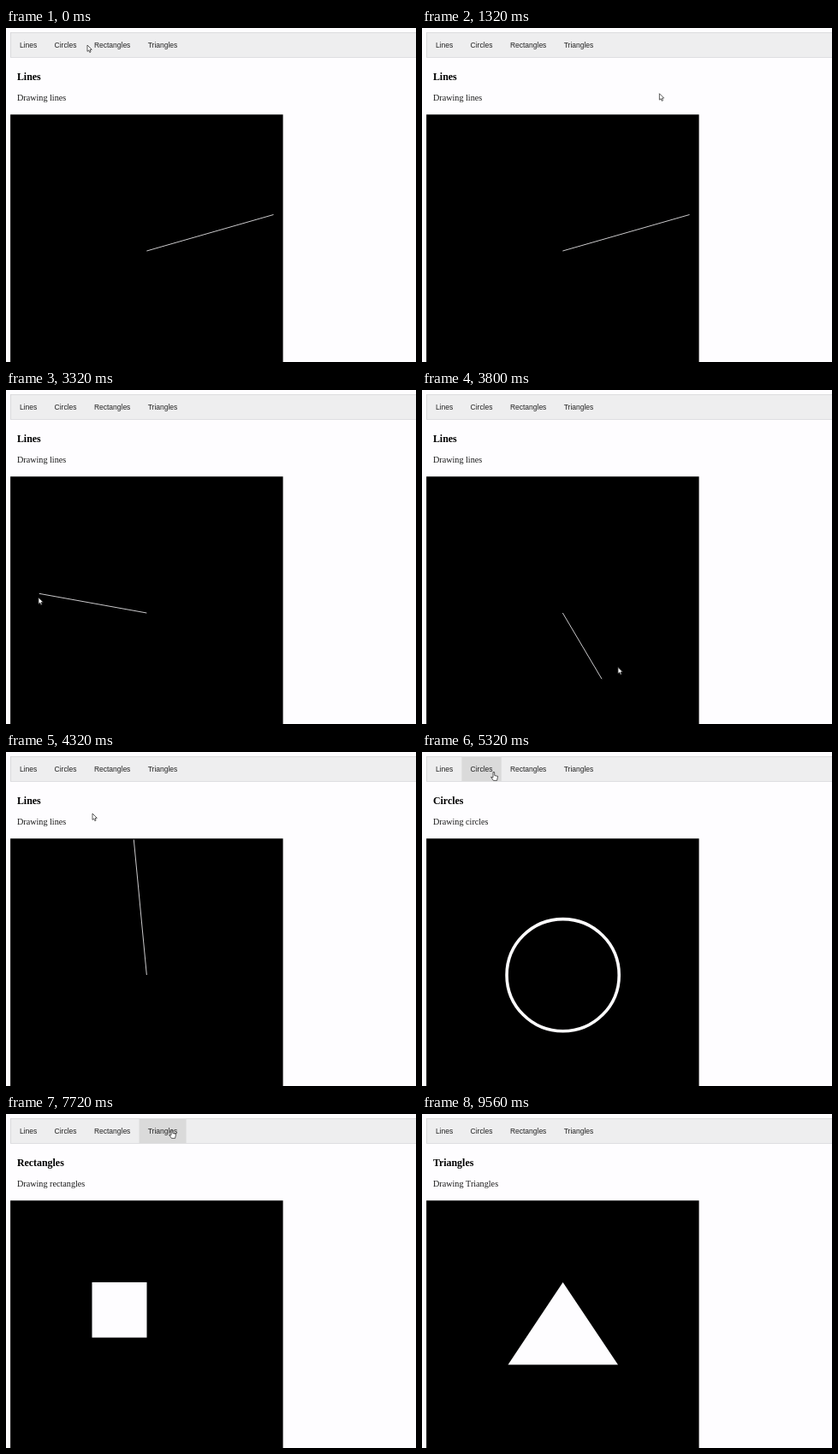
An HTML page with a canvas for the animation above (9.88 s loop, 479x391 px).

```html
<!DOCTYPE html>
<html lang="en">
<head>
<meta charset="utf-8">
<title>Drawing shapes</title>
<style>
  html, body { margin: 0; width: 100%; height: 100%; overflow: hidden; background: #fefdff; }
  canvas { display: block; width: 479px; height: 391px; }
</style>
</head>
<body>
<canvas id="stage"></canvas>
<script>
const LOOP = 9880, STEP = 40, PAPER = '#fefdff';
const SANS = '8.49px "Liberation Sans", Arial, sans-serif';
const SERIF = '"Liberation Serif", "Times New Roman", serif';
const area = { x: 5.1, y: 101.3, w: 318.5, h: 290 };
const center = { x: area.x + area.w / 2, y: 261 };
const nav = { x: 5.7, top: 5.7, bottom: 34 };

const stage = document.getElementById('stage');
const ratio = window.devicePixelRatio || 1;
stage.width = 479 * ratio;
stage.height = 391 * ratio;
const ctx = stage.getContext('2d');
ctx.scale(ratio, ratio);

// Each tab is as wide as its name plus padding; it opens at its click time.
ctx.font = SANS;
const pad = 10.2;
let left = nav.x;
const tabs = [['Lines', 0], ['Circles', 4800], ['Rectangles', 6880], ['Triangles', 7960]]
  .map(([name, opens]) => {
    const width = ctx.measureText(name).width + 2 * pad, x = left;
    left += width;
    return { name, opens, x, width };
  });

// Eased mouse moves with rests between them: start, end, x, y, sideways bend
const moves = [
  [0, 1000, 150, 70, -22],
  [1040, 1640, 433, 85],
  [1900, 2240, 189, 132],
  [2240, 2880, 70, 43],
  [2880, 3320, 38, 243],
  [3320, 3880, 246, 312, 100],
  [3880, 4320, 101, 72, 47],
  [4320, 4760, 84, 23],
  [5320, 5920, 146, 128],
  [6080, 6520, 124, 20],
  [6880, 7600, 194, 18],
  [7960, 8480, 372, -30, 40]
];

function mouse(t) {
  t = (t + LOOP) % LOOP;
  let x = 95, y = 20;
  for (const [start, end, toX, toY, bend = 0] of moves) {
    if (t < start) break;
    const u = Math.min(1, (t - start) / (end - start));
    const s = u * u * (3 - 2 * u);
    const dx = toX - x, dy = toY - y;
    const side = bend * Math.sin(Math.PI * s) / Math.hypot(dx, dy);
    x += dx * s - dy * side;
    y += dy * s + dx * side;
  }
  return [x, y];
}

function overTab(t) {
  const [x, y] = mouse(t);
  if (y < nav.top || y > nav.bottom) return -1;
  return tabs.findIndex(tab => x >= tab.x && x < tab.x + tab.width);
}

// The line keeps pointing at the last mouse place inside the black area.
function lineEnd(t) {
  for (t -= STEP; t > 1900; t -= STEP) {
    const [x, y] = mouse(t);
    if (x >= area.x && x <= area.x + area.w && y >= area.y) return [x, y];
  }
  return [312.5, 218.5];
}

function text(words, x, y, font, color) {
  ctx.font = font;
  ctx.fillStyle = color;
  ctx.fillText(words, x, y);
}

function box(color, x, y, w, h) {
  ctx.fillStyle = color;
  ctx.fillRect(x, y, w, h);
}

function poly(...points) {
  ctx.beginPath();
  points.forEach(([x, y]) => ctx.lineTo(x, y));
  ctx.closePath();
}

function drawNav(t) {
  const height = nav.bottom - nav.top;
  box('#d2d2d5', 5, 5, 474, height + 1.4);
  box('#eeeeef', nav.x, nav.top, 474, height);
  tabs.forEach((tab, i) => {
    let heat = 0;
    for (let k = 1; k <= 8; k++) heat += (overTab(t - k * STEP) === i) / 8;
    const shade = Math.round(238 - 20 * heat);
    if (heat) box(`rgb(${shade},${shade},${shade})`, tab.x, nav.top, tab.width, height);
    text(tab.name, tab.x + pad, 22.6, SANS, '#222');
  });
}

const shapes = [
  t => {
    ctx.beginPath();
    ctx.moveTo(center.x, center.y);
    ctx.lineTo(...lineEnd(t));
    ctx.lineWidth = 0.8;
    ctx.stroke();
  },
  () => {
    ctx.beginPath();
    ctx.arc(center.x + 0.3, center.y + 0.2, 65.6, 0, 7);
    ctx.lineWidth = 3.6;
    ctx.stroke();
  },
  () => box(PAPER, 100.5, 197, 64, 64.7),
  () => {
    poly([164.6, 197], [100.5, 293.5], [229, 293.5]);
    ctx.fill();
  }
];

function drawMouse(t) {
  const [x, y] = mouse(t);
  ctx.save();
  ctx.translate(x, y);
  if (overTab(t - 2 * STEP) >= 0 && overTab(t) >= 0) {
    poly([-1, 0.5], [0.6, 0.5], [0.8, 4.5], [4.6, 5.4], [3.6, 10.4], [-0.6, 10.4], [-3.4, 6.4], [-1, 6.8]);
  } else {
    poly([0, 0], [0, 7.4], [1.7, 6], [2.8, 8.6], [4.1, 8], [3, 5.5], [5.3, 5.3]);
  }
  ctx.fillStyle = '#fff';
  ctx.strokeStyle = '#333';
  ctx.lineWidth = 0.8;
  ctx.lineJoin = 'round';
  ctx.fill();
  ctx.stroke();
  ctx.restore();
}

function draw(now) {
  const t = Math.floor(now % LOOP / STEP) * STEP;
  const page = tabs.filter(tab => t >= tab.opens).length - 1;
  const { name } = tabs[page];
  box(PAPER, 0, 0, 479, 391);
  drawNav(t);
  text(name, 12.9, 61, `bold 11.92px ${SERIF}`, '#000');
  text('Drawing ' + (page === 3 ? name : name.toLowerCase()), 12.9, 85.2, `10.19px ${SERIF}`, '#1a1a1a');
  box('#000', area.x, area.y, area.w, area.h);
  ctx.fillStyle = ctx.strokeStyle = PAPER;
  shapes[page](t);
  drawMouse(t);
}

const start = performance.now();
function tick() {
  draw(performance.now() - start);
  requestAnimationFrame(tick);
}
tick();
</script>
</body>
</html>
```
